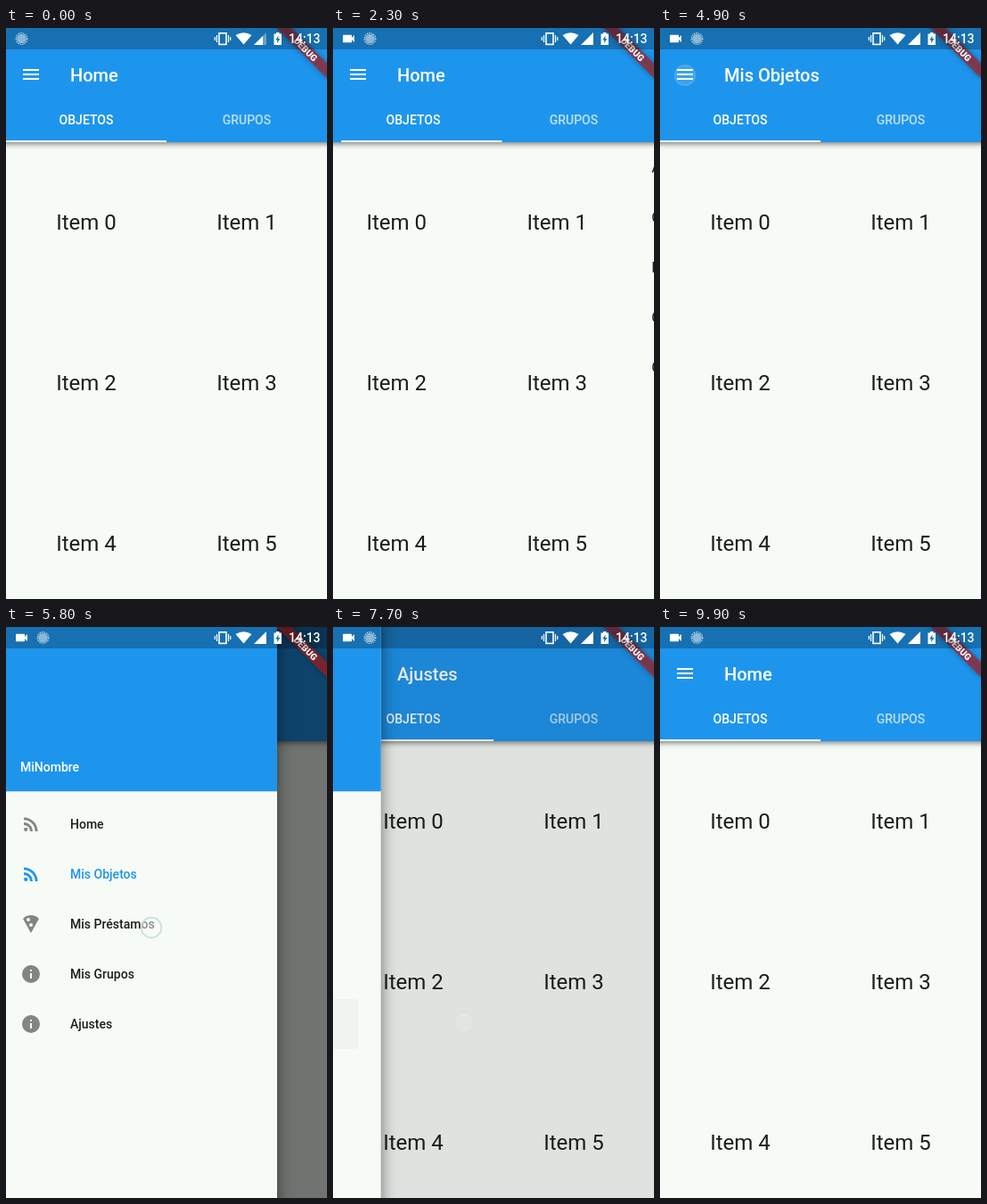
An HTML page with a canvas that plays this animation: 360 px wide and 640 px high, repeating every 10 s.

```html
<!DOCTYPE html>
<html lang="es">
<head>
<meta charset="utf-8">
<title>Home</title>
<style>
  html, body { margin: 0; width: 100%; height: 100%; overflow: hidden; background: #f6fbf6; }
  canvas { display: block; width: 360px; height: 640px; }
</style>
</head>
<body>
<canvas id="stage"></canvas>
<script>
const W = 360, H = 640, LOOP = 10000, DRAWER = 304;
const BLUE = '#1e95ec', PAPER = '#f6fbf6', INK = '#1c1e1c', GREY = '#828682';

const canvas = document.getElementById('stage');
const ctx = canvas.getContext('2d');
const dpr = window.devicePixelRatio || 1;
canvas.width = W * dpr;
canvas.height = H * dpr;

const icons = {
  rss: new Path2D('M4 17.82a2.18 2.18 0 1 0 4.36 0a2.18 2.18 0 1 0-4.36 0zM4 4.44v2.83c7.03 0 12.73 5.7 12.73 12.73h2.83c0-8.59-6.97-15.56-15.56-15.56zM4 10.1v2.83c3.9 0 7.07 3.17 7.07 7.07h2.83c0-5.47-4.43-9.9-9.9-9.9z'),
  pizza: new Path2D('M12 2C8.43 2 5.23 3.54 3.01 6L12 22l8.99-16C18.78 3.55 15.57 2 12 2zM7 7a2 2 0 1 0 4 0a2 2 0 1 0-4 0zM10 13a2 2 0 1 0 4 0a2 2 0 1 0-4 0z'),
  info: new Path2D('M2 12a10 10 0 1 0 20 0a10 10 0 1 0-20 0zM11 11h2v6h-2zM11 7h2v2h-2z'),
  camera: new Path2D('M17 10.5V7c0-.55-.45-1-1-1H4c-.55 0-1 .45-1 1v10c0 .55.45 1 1 1h12c.55 0 1-.45 1-1v-3.5l4 4v-11z')
};

const menu = [
  ['Home', 'rss'], ['Mis Objetos', 'rss'], ['Mis Préstamos', 'pizza'],
  ['Mis Grupos', 'info'], ['Ajustes', 'info']
];
const groups = ['Amigos', 'Oficina', 'Familia', 'Compañeros', 'Gimnasio'];

// Each visit: drawer opens, an entry is picked, drawer closes.
const visits = [
  { open: 3130, close: 4150, pick: 1 },
  { open: 5080, close: 5930, pick: 2 },
  { open: 6780, close: 7560, pick: 4 },
  { open: 8430, close: 9220, pick: 0 }
];

const swipes = [
  { down: 200, up: 700, from: 0, to: 190, end: 360 },
  { down: 1600, up: 2035, from: 360, to: 170, end: 0 }
];

const touches = [
  { down: 150, up: 700, x: 290, y: 345, dx: -190, move: 200 },
  { down: 1550, up: 2035, x: 85, y: 350, dx: 190, move: 1600 },
  { down: 3900, up: 4060, x: 124, y: 279 },
  { down: 5650, up: 5850, x: 163, y: 337 },
  { down: 7350, up: 7560, x: 147, y: 443 },
  { down: 8950, up: 9140, x: 175, y: 221 },
  ...visits.map(v => ({ down: v.open - 200, up: v.open - 30, x: 28, y: 53 }))
];

const clamp = v => Math.min(1, Math.max(0, v));
const smooth = v => v * v * (3 - 2 * v);

// Remaining distance of a critically damped spring.
function spring(ms, omega) {
  if (ms <= 0) return 1;
  const k = omega * ms / 1000;
  const left = Math.exp(-k) * (1 + k);
  return left < 0.003 ? 0 : left;
}

function pageOffset(t) {
  let x = 0;
  for (const s of swipes) {
    if (t < s.down) break;
    x = t < s.up
      ? s.from + (s.to - s.from) * smooth((t - s.down) / (s.up - s.down))
      : s.end + (s.to - s.end) * spring(t - s.up, 14.14);
  }
  return x;
}

function drawerState(t) {
  let amount = 0, selected = 0, tap = null;
  for (const v of visits) {
    if (t < v.open) break;
    amount = t < v.close ? 1 - spring(t - v.open, 22.4) : spring(t - v.close, 22.4);
    if (t >= v.close) {
      selected = v.pick;
      tap = v;
    }
  }
  return { amount, selected, tap };
}

function text(str, x, y, size, color, weight = 500, align = 'left') {
  ctx.font = `${weight} ${size}px Roboto, sans-serif`;
  ctx.textAlign = align;
  ctx.fillStyle = color;
  ctx.fillText(str, x, y);
}

function rect(x, y, w, h, color) {
  ctx.fillStyle = color;
  ctx.fillRect(x, y, w, h);
}

function icon(name, x, y, color, scale = 1) {
  ctx.save();
  ctx.translate(x, y);
  ctx.scale(scale, scale);
  ctx.translate(-12, -12);
  ctx.fillStyle = color;
  ctx.fill(icons[name], 'evenodd');
  ctx.restore();
}

function shape(points, color) {
  ctx.beginPath();
  points.forEach(([x, y]) => ctx.lineTo(x, y));
  ctx.closePath();
  ctx.fillStyle = color;
  ctx.fill();
}

function shadowed(blur, dy, alpha, draw) {
  ctx.save();
  ctx.shadowColor = `rgba(0,0,0,${alpha})`;
  ctx.shadowBlur = blur * dpr;
  ctx.shadowOffsetY = dy * dpr;
  draw();
  ctx.restore();
}

function drawPage(offset, title) {
  rect(0, 0, W, H, PAPER);
  for (let i = 0; i < 6; i++) {
    text('Item ' + i, 90 + 180 * (i % 2) - offset, 226 + 180 * Math.floor(i / 2), 24, INK, 400, 'center');
  }
  groups.forEach((name, i) => text(name, W + 16 - offset, 162 + 56 * i, 16, INK, 400));

  shadowed(6, 2, 0.5, () => rect(-10, 0, W + 20, 128, BLUE));
  for (const y of [46, 51, 56]) rect(19, y, 18, 2, '#fff');
  text(title, 72, 60, 20, '#fff');
  const p = offset / W;
  text('OBJETOS', 90, 108, 14, `rgba(255,255,255,${1 - 0.3 * p})`, 500, 'center');
  text('GRUPOS', 270, 108, 14, `rgba(255,255,255,${0.7 + 0.3 * p})`, 500, 'center');
  rect(offset / 2, 126, 180, 2, '#fff');
}

function drawDrawer(t, { amount, selected, tap }) {
  if (amount <= 0) return;
  rect(0, 0, W, H, `rgba(0,0,0,${0.54 * amount})`);
  ctx.save();
  ctx.translate(DRAWER * (amount - 1), 0);
  shadowed(16, 4, 0.5, () => rect(0, -20, DRAWER, H + 40, PAPER));
  rect(0, 0, DRAWER, 184, BLUE);
  rect(0, 184, DRAWER, 1, '#c9dbe4');
  text('MiNombre', 16, 162, 14, '#fff');

  if (tap) {
    ctx.fillStyle = `rgba(0,0,0,${0.045 * clamp(1 - (t - tap.close) / 400)})`;
    ctx.beginPath();
    ctx.roundRect(0, 193 + 56 * tap.pick, 279, 56, 4);
    ctx.fill();
  }
  menu.forEach(([label, name], i) => {
    const y = 221 + 56 * i, on = i === selected;
    icon(name, 28, y, on ? BLUE : GREY);
    text(label, 72, y + 5, 14, on ? BLUE : INK);
  });
  ctx.restore();
}

function drawBanner() {
  ctx.save();
  ctx.translate(W, 0);
  ctx.rotate(Math.PI / 4);
  shadowed(6, 0, 0.5, () => rect(-40, 28, 80, 12, 'rgba(183,28,28,0.63)'));
  text('DEBUG', 0, 37.6, 10.2, '#fff', 900, 'center');
  ctx.restore();
}

function drawTouches(t) {
  for (const p of touches) {
    const a = clamp((t - p.down) / 80) * clamp(1 - (t - p.up) / 200);
    if (a <= 0) continue;
    const move = p.dx ? p.dx * smooth(clamp((t - p.move) / (p.up - p.move))) : 0;
    ctx.save();
    ctx.globalAlpha = a;
    ctx.beginPath();
    ctx.arc(p.x + move, p.y, 11.3, 0, 7);
    ctx.fillStyle = 'rgba(248,252,250,0.5)';
    ctx.fill();
    ctx.strokeStyle = 'rgba(196,219,218,0.9)';
    ctx.lineWidth = 1.7;
    ctx.stroke();
    ctx.restore();
  }
}

function drawStatus(t) {
  const fresh = t < 100;
  rect(0, 0, W, 24, 'rgba(0,0,0,0.25)');

  if (!fresh) icon('camera', 17.5, 12, '#fff', 0.72);
  const x = fresh ? 17.5 : 41.5;
  ctx.beginPath();
  ctx.arc(x, 12, 5.3, 0, 7);
  ctx.fillStyle = 'rgba(255,255,255,0.5)';
  ctx.fill();
  ctx.beginPath();
  ctx.arc(x, 12, 6.3, 0, 7);
  ctx.strokeStyle = 'rgba(255,255,255,0.75)';
  ctx.lineWidth = 1.2;
  ctx.setLineDash([1.5, 1]);
  ctx.stroke();
  ctx.setLineDash([]);

  // Vibration
  ctx.strokeStyle = '#fff';
  ctx.lineWidth = 1.6;
  ctx.strokeRect(239, 5.8, 8, 12.6);
  for (const side of [-1, 1]) {
    rect(243 + side * 6.5 - 0.6, 8, 1.2, 8, '#fff');
    rect(243 + side * 8.7 - 0.6, 10, 1.2, 4, '#fff');
  }

  // Wi-Fi
  ctx.beginPath();
  ctx.moveTo(266.5, 18.5);
  ctx.lineTo(257.5, 8);
  ctx.quadraticCurveTo(266.5, 2.6, 275.5, 8);
  ctx.closePath();
  ctx.fillStyle = '#fff';
  ctx.fill();

  // Signal
  shape([[278, 19], [292, 19], [292, 5]], fresh ? 'rgba(255,255,255,0.35)' : '#fff');
  if (fresh) shape([[278, 19], [288, 19], [288, 9]], '#fff');

  // Battery
  rect(300.5, 6.5, 8.5, 12.5, '#fff');
  rect(303, 5, 3.5, 2, '#fff');
  shape([[305.6, 8.5], [302.2, 13.6], [304.3, 13.6], [304, 17.2], [307.4, 12], [305.3, 12]], '#176fb0');

  text('14:13', 317, 17, 14, '#fff');
}

function frame(now) {
  const t = now % LOOP;
  const drawer = drawerState(t);
  ctx.setTransform(dpr, 0, 0, dpr, 0, 0);
  drawPage(pageOffset(t), menu[drawer.selected][0]);
  drawDrawer(t, drawer);
  drawBanner();
  drawStatus(t);
  drawTouches(t);
}

const start = performance.now();
function tick() {
  frame(performance.now() - start);
  requestAnimationFrame(tick);
}
tick();
</script>
</body>
</html>
```
